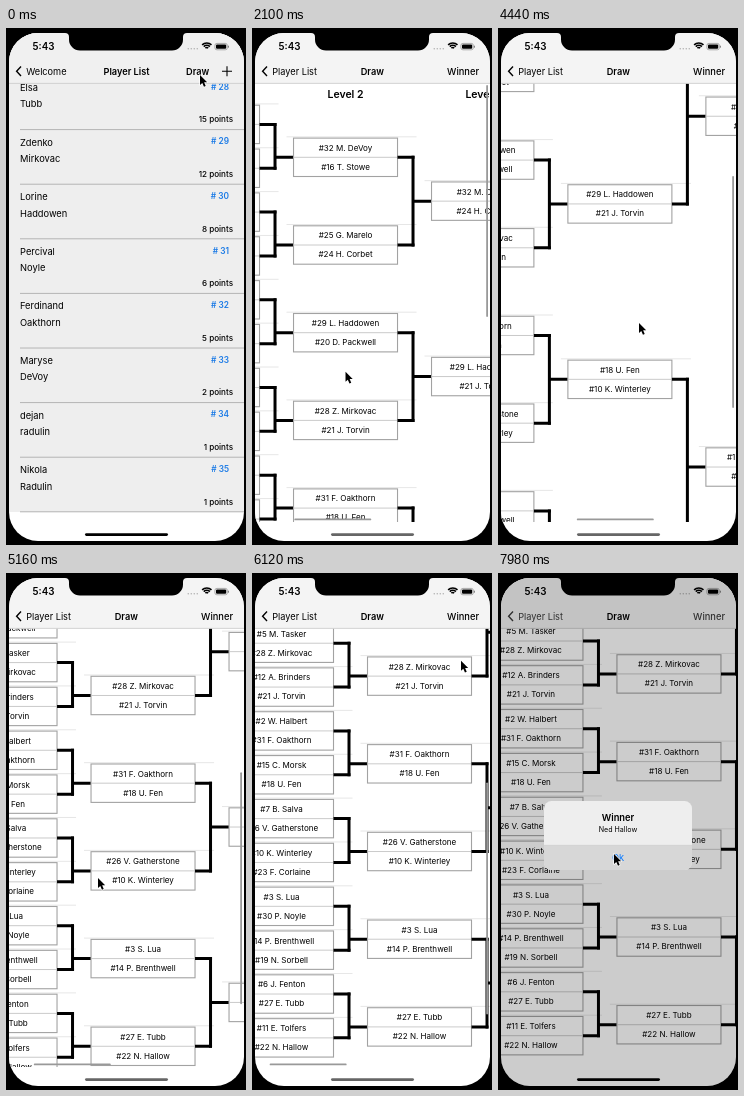
Recreate the animation shown at these times as an HTML page with a canvas. Size 240x517 px, loop 8000 ms.

```html
<!DOCTYPE html>
<html lang="en">
<head>
<meta charset="utf-8">
<title>Tournament draw</title>
<style>
html, body { margin: 0; width: 100%; height: 100%; overflow: hidden; background: #000; }
canvas { display: block; width: 240px; height: 517px; }
</style>
</head>
<body>
<canvas id="stage"></canvas>
<script>
const W = 240, H = 517, LOOP = 8000;
const canvas = document.getElementById('stage');
const dpr = window.devicePixelRatio || 1;
canvas.width = W * dpr;
canvas.height = H * dpr;
const c = canvas.getContext('2d');

const BLUE = '#1c7be6';
const LEFT = 3, RIGHT = 238, TOP = 5, BOTTOM = 513, BAR = 55.5;
const BOX_W = 104, BOX_H = 38.4, PITCH = 138;

// Player list
const ROW = 54.6;
const players = [
  ['Elsa', 'Tubb', 15], ['Zdenko', 'Mirkovac', 12], ['Lorine', 'Haddowen', 8],
  ['Percival', 'Noyle', 6], ['Ferdinand', 'Oakthorn', 5], ['Maryse', 'DeVoy', 2],
  ['dejan', 'radulin', 1], ['Nikola', 'Radulin', 1]
];

// Bracket: first round entries, then which side of each box goes through
const entries = `32 M. DeVoy,1 R. Calsey,16 T. Stowe,9 O. Brammel,4 D. Quillen,25 G. Marelo,
17 N. Ostrey,24 H. Corbet,8 I. Pellam,29 L. Haddowen,13 W. Jessop,20 D. Packwell,
5 M. Tasker,28 Z. Mirkovac,12 A. Brinders,21 J. Torvin,2 W. Halbert,31 F. Oakthorn,
15 C. Morsk,18 U. Fen,7 B. Salva,26 V. Gatherstone,10 K. Winterley,23 F. Corlaine,
3 S. Lua,30 P. Noyle,14 P. Brenthwell,19 N. Sorbell,6 J. Fenton,27 E. Tubb,
11 E. Tolfers,22 N. Hallow`.split(',').map(s => '#' + s.trim());
const titles = ['Level 1', 'Level 2', 'Level 3', 'Semi Final', 'Final'];
const picks = ['0011111111100011', '01011101', '1111', '11'];
const levels = [entries];
picks.forEach((bits, i) =>
  levels.push([...bits].map((b, k) => levels[i][2 * k + Number(b)])));

const clamp = v => Math.max(0, Math.min(1, v));
const span = (t, a, b) => clamp((t - a) / (b - a));
const mix = (a, b, p) => a + (b - a) * p;
const smooth = p => p * p * (3 - 2 * p);
const easeOut = p => 1 - Math.pow(1 - p, 3);
const flick = p => p * p;
const flick2 = p => Math.pow(p, 2.5);
const coast = dt => 1 - Math.exp(-dt / 422);

// Drag phases: press and release times
const DRAG1 = [1614, 2170], DRAG2 = [3950, 4208];

// Start time, end time, end position, easing
const cursorPath = [
  [59, 60, 194, 46, smooth],
  [980, 1480, 204, 346, smooth],
  [...DRAG1, 60, 343, flick],
  [3200, 3700, 60, 380, smooth],
  [...DRAG2, 141, 295, flick2],
  [4480, 5100, 92, 305, smooth],
  [5560, 6120, 209, 88, smooth],
  [6120, 6480, 210, 43, easeOut],
  [7140, 7860, 116, 281, smooth]
];

function cursorAt(t) {
  let x = 194, y = 47;
  for (const [a, b, nx, ny, ease] of cursorPath) {
    const p = ease(span(t, a, b));
    x = mix(x, nx, p);
    y = mix(y, ny, p);
  }
  return [x, y];
}

function scrollAt(t) {
  if (t < DRAG2[0]) {
    const k = coast(Math.max(0, t - DRAG1[1]));
    return [144 * flick(span(t, ...DRAG1)) + 299.5 * k, 0];
  }
  const p = flick2(span(t, ...DRAG2));
  const k = coast(Math.max(0, t - DRAG2[1]));
  return [439 - 81 * p - 325 * k, 85 * p + 206.5 * k];
}

function text(s, x, y, size, o = {}) {
  c.save();
  c.globalAlpha *= o.alpha ?? 1;
  c.font = `${o.weight || 400} ${size}px Inter, "Liberation Sans", sans-serif`;
  c.textAlign = o.align || 'left';
  c.textBaseline = 'alphabetic';
  c.fillStyle = o.color || '#000';
  c.fillText(s, x, y + size * 0.36);
  c.restore();
}

function rect(x, y, w, h, color) {
  c.fillStyle = color;
  c.fillRect(x, y, w, h);
}

function pill(x, y, w, h, r, color) {
  c.beginPath();
  c.roundRect(x, y, w, h, r);
  c.fillStyle = color;
  c.fill();
}

function line(color, width, ...pts) {
  c.beginPath();
  for (let i = 0; i < pts.length; i += 2) c.lineTo(pts[i], pts[i + 1]);
  c.strokeStyle = color;
  c.lineWidth = width;
  c.stroke();
}

function drawList() {
  rect(LEFT, TOP, 235, 508, '#fff');
  rect(LEFT, TOP, 235, 479, '#eeeeee');
  players.forEach(([first, last, points], i) => {
    const y = 47 + i * ROW;
    text(first, 14, y + 12.6, 9.3);
    text(last, 14, y + 29, 9.3);
    text('# ' + (28 + i), 223, y + 11.8, 8.3, { align: 'right', weight: 600, color: BLUE });
    text(points + ' points', 227, y + 44.4, 8.1, { align: 'right', weight: 500 });
    line('#b4b4b4', 1, 14, y + ROW, RIGHT, y + ROW);
  });
}

const boxY = (level, i) => level === 0
  ? 96.4 + 43.85 * i
  : 85.45 + 43.85 * Math.pow(2, level) * (i + 0.5);

function drawBox(x, y, pair) {
  const top = y - BOX_H / 2;
  line('#e0e0e0', 0.8, x - 7, top - 1.3, x + BOX_W + 19, top - 1.3);
  rect(x, top, BOX_W, BOX_H, '#fff');
  c.strokeStyle = '#a2a2a2';
  c.lineWidth = 1.1;
  c.strokeRect(x, top, BOX_W, BOX_H);
  line('#c4c4c4', 0.9, x, y, x + BOX_W, y);
  text(pair[0], x + BOX_W / 2, y - 9.5, 8.05, { align: 'center' });
  text(pair[1], x + BOX_W / 2, y + 9.5, 8.05, { align: 'center' });
}

function drawBracket(t) {
  const [sx, sy] = scrollAt(t);
  rect(LEFT, TOP, 235, 508, '#fff');
  c.save();
  c.beginPath();
  c.rect(LEFT, BAR, 235, 438.5);
  c.clip();
  levels.forEach((names, level) => {
    const x = 14 + level * PITCH - sx;
    if (x > 300 || x < -180) return;
    const stem = x + BOX_W + 15.5;
    text(titles[level], x + BOX_W / 2, 66 - sy, 10.5, { align: 'center', weight: 600 });
    for (let i = 0; i < names.length / 2; i++) {
      const y = boxY(level, i) - sy;
      drawBox(x, y, names.slice(2 * i, 2 * i + 2));
      if (level < 4) {
        line('#000', 3, x + BOX_W, y, stem + 1.5, y);
        if (i % 2) {
          const mid = boxY(level + 1, (i - 1) / 2) - sy;
          line('#000', 3, stem, boxY(level, i - 1) - sy - 1.5, stem, y + 1.5);
          line('#000', 3, stem, mid, x + PITCH, mid);
        }
      }
    }
  });
  c.globalAlpha *= span(t, 1500, 1640) * (1 - span(t, 6500, 6780));
  pill(234.2, 57 + 0.527 * sy, 1.8, 232, 0.9, '#999');
  pill(5.5 + 0.333 * sx, 490.5, 77, 1.8, 0.9, '#999');
  c.restore();
}

function backItem(label, alpha, shift, color) {
  text(label, 20.2 + shift, 43.5, 9.2, { alpha, color });
}

function drawNav(t, e) {
  rect(LEFT, TOP, 235, BAR - TOP, e < 0.5 ? '#f0f0f0' : '#f4f4f4');
  rect(LEFT, BAR - 0.6, 235, 0.7, '#c4c4c4');
  const tint = t > 7040 ? '#3c3c3c' : '#000';
  line(tint, 1.4, 15, 38.6, 10.6, 43.3, 15, 48);

  const center = { align: 'center', weight: 600 };
  if (e < 1) {
    const press = t >= 240 ? 0.35 : 1;
    const out = 1 - span(e, 0, 0.7);
    backItem('Welcome', out, -30 * e, tint);
    text('Player List', mix(120.5, 42, e), 43.5, 9.2, { ...center, alpha: out });
    text('Draw', 180, 43.5, 9.2, { weight: 600, alpha: press * out });
    c.save();
    c.globalAlpha = out;
    line('#000', 1.1, 216, 43.3, 226, 43.3);
    line('#000', 1.1, 221, 38.3, 221, 48.3);
    c.restore();
  }
  if (e > 0) {
    const show = span(e, 0.2, 1);
    const press = 1 - 0.65 * span(t, 6600, 6780) * (1 - span(t, 6960, 7080));
    backItem('Player List', show, 78 * (1 - e), tint);
    text('Draw', mix(215, 120.3, e), 43.5, 9.2, { ...center, alpha: show });
    text('Winner', 227, 43.5, 9.3,
      { align: 'right', weight: 500, color: tint, alpha: show * press });
  }
}

function drawStatus() {
  text('5:43', 37.5, 18.8, 9.8, { align: 'center', weight: 600 });
  for (let i = 0; i < 4; i++) pill(181.5 + i * 3, 20, 1.5, 1.5, 0.7, '#b0b0b0');
  for (const r of [2, 4.3, 6.6]) {
    c.beginPath();
    c.arc(200.8, 21.6, r, -Math.PI * 0.75, -Math.PI * 0.25);
    c.lineWidth = 1.6;
    c.strokeStyle = '#000';
    c.stroke();
  }
  c.beginPath();
  c.roundRect(208.9, 15.4, 12.4, 6.4, 2);
  c.strokeStyle = '#888';
  c.lineWidth = 0.7;
  c.stroke();
  pill(210, 16.4, 10.2, 4.4, 1.1, '#000');
  pill(222, 17.4, 1, 2.4, 0.5, '#888');
}

function drawAlert(t) {
  const p = easeOut(span(t, 7020, 7360));
  if (!p) return;
  rect(LEFT, TOP, 235, 508, `rgba(0,0,0,${0.2 * p})`);
  const s = mix(1.15, 1, p);
  c.save();
  c.globalAlpha = p;
  c.translate(120, 262.5);
  c.scale(s, s);
  c.beginPath();
  c.roundRect(-74, -34.5, 148, 69, 7.5);
  c.clip();
  rect(-74, -34.5, 148, 69, '#eeeeee');
  if (t >= 7860) rect(-74, 9.8, 148, 25, '#d7d7d7');
  line('#c8c8c8', 0.6, -74, 9.8, 74, 9.8);
  text('Winner', 0, -17.5, 9.3, { align: 'center', weight: 600 });
  text('Ned Hallow', 0, -5.7, 7.1, { align: 'center' });
  text('Ok', 0, 22.4, 9.3, { align: 'center', color: '#0a7aff' });
  c.restore();
}

function drawCursor(t) {
  const [x, y] = cursorAt(t);
  c.save();
  c.translate(x, y);
  c.scale(0.92, 0.92);
  c.beginPath();
  const pts = [0, 0, 0, 11, 2.5, 8.8, 4.3, 12.8, 6.2, 12, 4.5, 8, 7.8, 8];
  for (let i = 0; i < pts.length; i += 2) c.lineTo(pts[i], pts[i + 1]);
  c.closePath();
  c.lineJoin = 'round';
  c.lineWidth = 1.5;
  c.strokeStyle = '#fff';
  c.stroke();
  c.fillStyle = '#000';
  c.fill();
  c.restore();
}

function drawNotch() {
  c.beginPath();
  c.moveTo(59, 4);
  c.lineTo(59, TOP);
  c.arcTo(63, TOP, 63, 9, 4);
  c.arcTo(63, 22.5, 74, 22.5, 11);
  c.arcTo(177, 22.5, 177, 11, 11);
  c.arcTo(177, TOP, 181, TOP, 4);
  c.lineTo(181, 4);
  c.fillStyle = '#000';
  c.fill();
}

function draw(t) {
  c.setTransform(dpr, 0, 0, dpr, 0, 0);
  rect(0, 0, W, H, '#000');
  const e = easeOut(span(t, 640, 1140));

  c.save();
  c.beginPath();
  c.roundRect(LEFT, TOP, RIGHT - LEFT, BOTTOM - TOP, 29);
  c.clip();
  if (e < 1) {
    c.save();
    c.translate(-70 * e, 0);
    drawList();
    c.restore();
    if (e > 0) rect(LEFT, TOP, 235, 508, `rgba(0,0,0,${0.1 * e})`);
  }
  if (e > 0) {
    c.save();
    c.translate(235 * (1 - e), 0);
    drawBracket(t);
    c.restore();
  }
  drawNav(t, e);
  drawStatus();
  pill(79, 505.2, 83, 2.8, 1.4, e > 0.5 && t < 7040 ? '#666' : '#000');
  drawAlert(t);
  drawNotch();
  c.restore();
  drawCursor(t);
}

const start = performance.now();
function tick() {
  draw((performance.now() - start) % LOOP);
  requestAnimationFrame(tick);
}
tick();
</script>
</body>
</html>
```
